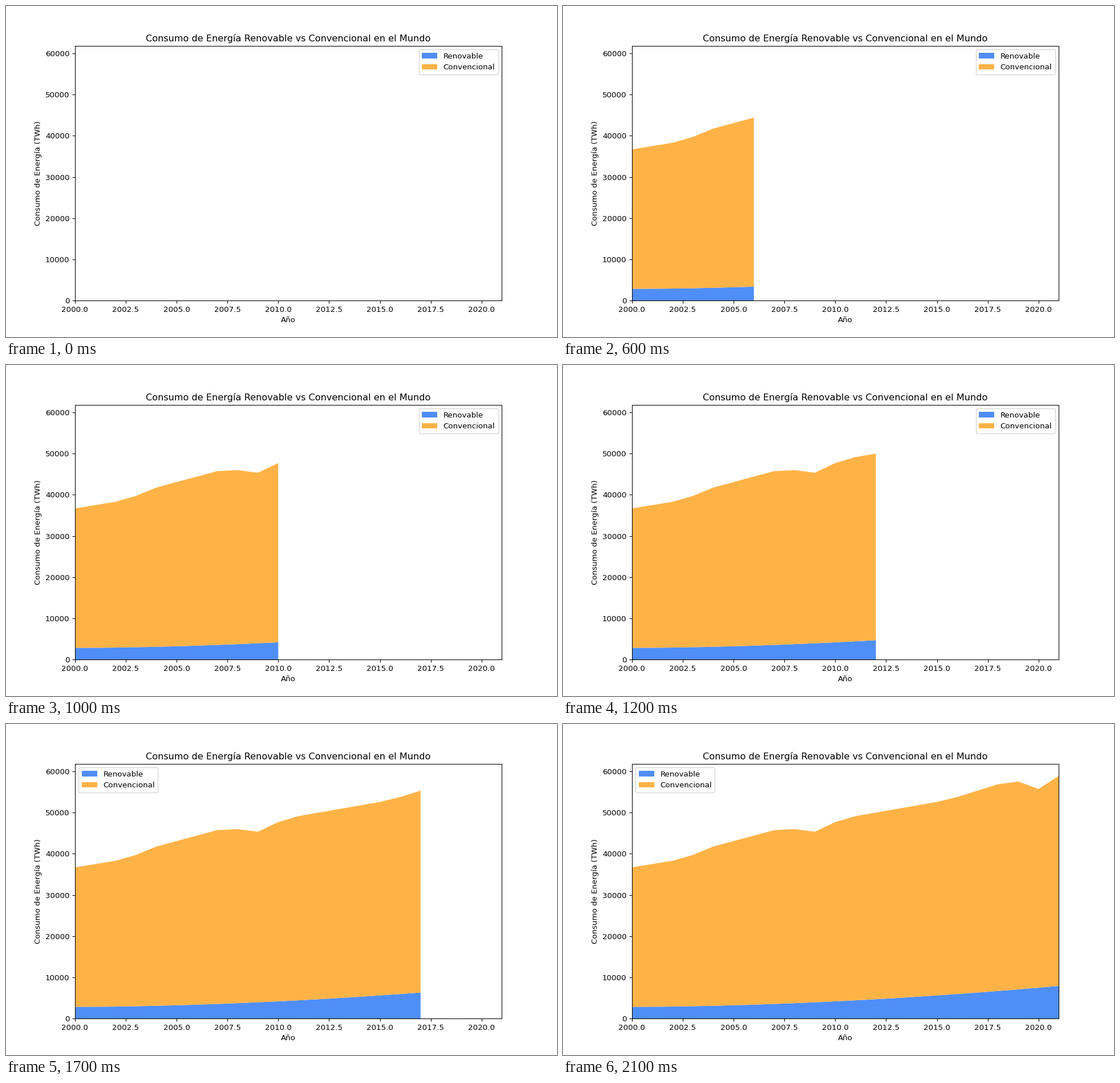
These frames come from a looping animation (966x580 px, 2.2 s). A matplotlib script:

```python
import matplotlib.pyplot as plt
import numpy as np
from matplotlib.animation import FuncAnimation

W, H, DPI = 966, 580, 96.6
COLORS = ["#4F8EF7", "#FFB347"]
LABELS = ["Renovable", "Convencional"]

years = np.arange(2000, 2022)
t = years - years[0]


def dip(year, depth, width):
    return depth * np.exp(-((years - year) / width) ** 2)


# Renewables grow along a power curve; the total follows a bent trend
# with a drop in each of two crisis years.
renewable = 2850 + 5080 * (t / t[-1]) ** 1.8
trend = np.interp(t, [0, 2.5, 4, 7, 12, 15.5, 18, 21],
                  [36690, 38700, 41740, 45750, 50000, 53000, 56860, 58914])
total = trend - dip(2009, 2100, 0.9) - dip(2020, 2500, 0.4)
conventional = total - renewable

# The small surplus keeps float rounding from losing a pixel.
fig, ax = plt.subplots(figsize=((W + 0.01) / DPI, (H + 0.01) / DPI), dpi=DPI)


def update(i):
    ax.clear()
    n = i + 1
    ax.stackplot(years[:n], renewable[:n], conventional[:n],
                 labels=LABELS, colors=COLORS)
    ax.set_xlim(years[0], years[-1])
    ax.set_ylim(0, total.max() * 1.05)
    ax.set_title("Consumo de Energía Renovable vs Convencional en el Mundo")
    ax.set_xlabel("Año")
    ax.set_ylabel("Consumo de Energía (TWh)")
    # The legend moves aside once the areas reach it.
    ax.legend(loc="upper left" if years[i] >= 2017 else "upper right")
    return ax.get_children()


anim = FuncAnimation(fig, update, frames=len(years), interval=100,
                     repeat=True, repeat_delay=0, blit=False)

plt.show()
```
